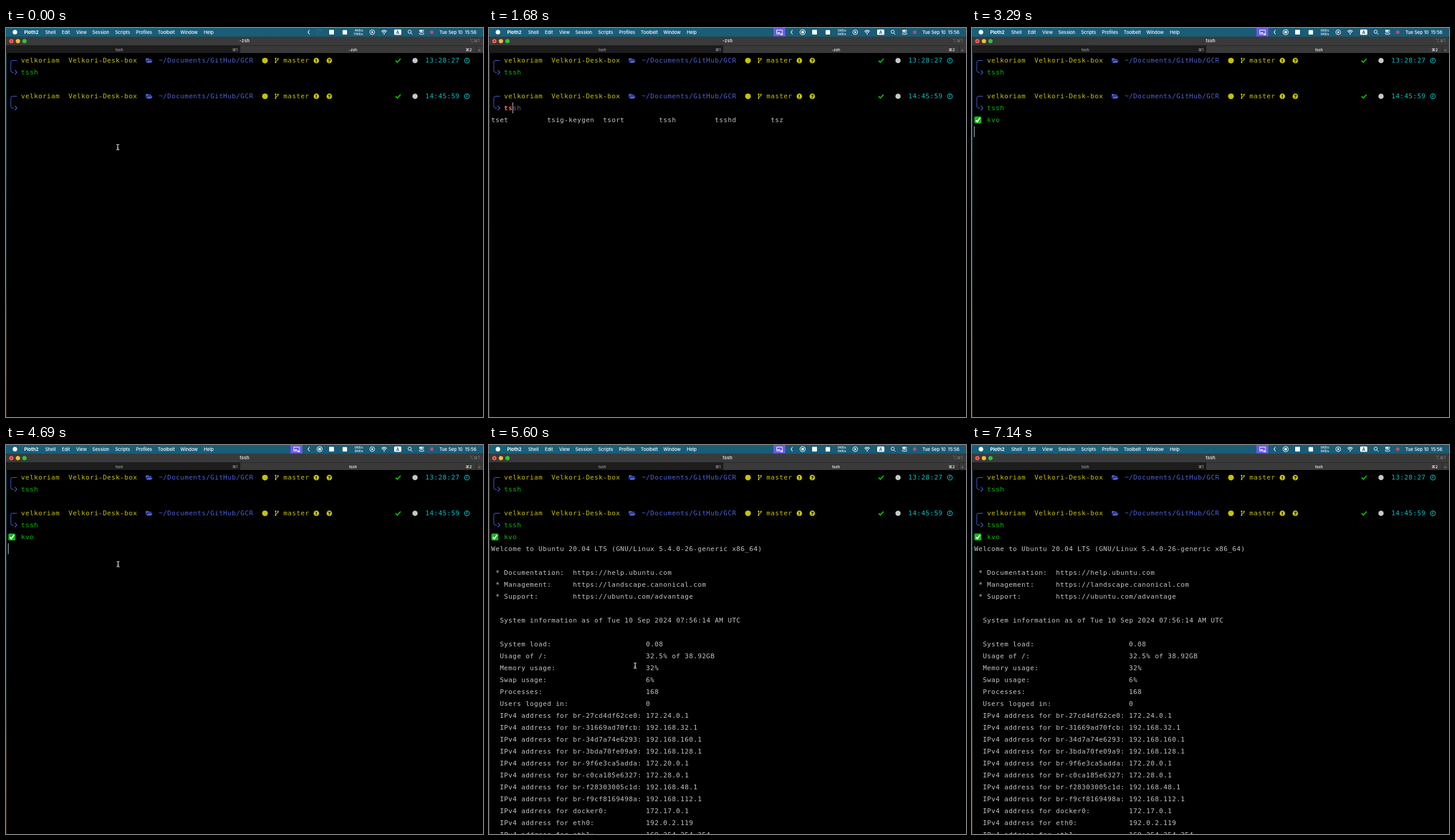
Write an HTML page with a canvas that moves like this. It is 800 px wide and 653 px high and loops after 7.7 s.

```html
<!DOCTYPE html>
<html lang="en">
<head>
<meta charset="utf-8">
<title>Terminal session</title>
<style>
  html, body { margin: 0; width: 100%; height: 100%; overflow: hidden; background: #000; }
  canvas { display: block; }
</style>
</head>
<body>
<canvas id="stage" width="800" height="653"></canvas>
<script>
const ctx = document.getElementById('stage').getContext('2d');
const LOOP = 7700, LEFT = 3.7, CELL = 7.213, ROW = 20;
const MONO = '11px "DejaVu Sans Mono", monospace', MONO_ADVANCE = 6.622;
const UI = 'Inter, sans-serif';
const C = {
  red: '#ff6e67', green: '#00c200', yellow: '#c7c400', blue: '#4e63d9', magenta: '#ca30c7',
  cyan: '#00c5c7', white: '#c7c7c7', gray: '#686868',
  hiCyan: '#60fdff', hiMagenta: '#ff77ff', hiBlue: '#6871ff'
};

const HOSTS = [
  ['kvo', '192.0.2.119', 'MY VPS VPN HK homeweb'],
  ['tallmeadow', '192.168.166.206', 'MY VPS SG homeweb'],
  ['snapwedges', '198.51.100.171', 'MY VPS US homeweb'],
  ['nas', 'velkoriam.com', 'NAS MY'],
  ['nas-ubuntu', 'velkoriam.com', 'NAS MY'],
  ['mistprism', '192.168.103.158', 'MY VPS US'],
  ['hpc', 'atlas8.vqu.edu.sg', 'VQU HCP'],
  ['medhpc', 'medbio.vqu.edu.sg', 'VQU HCP'],
  ['ktrc-vqu01', 'asp2a-login-vqu01', 'VQU KTRC'],
  ['ktrc-vqu02', 'asp2a-login-vqu02', 'VQU KTRC']
];
const WELCOME = `Welcome to Ubuntu 20.04 LTS (GNU/Linux 5.4.0-26-generic x86_64)

 * Documentation:  https://help.ubuntu.com
 * Management:     https://landscape.canonical.com
 * Support:        https://ubuntu.com/advantage

  System information as of Tue 10 Sep 2024 07:56:14 AM UTC
`.split('\n');
const INFO = [
  ['System load:', '0.08'], ['Usage of /:', '32.5% of 38.92GB'], ['Memory usage:', '32%'],
  ['Swap usage:', '6%'], ['Processes:', '168'], ['Users logged in:', '0'],
  ...Object.entries({
    'br-27cd4df62ce0': '172.24.0.1', 'br-31669ad70fcb': '192.168.32.1',
    'br-34d7a74e6293': '192.168.160.1', 'br-3bda70fe09a9': '192.168.128.1',
    'br-9f6e3ca5adda': '172.20.0.1', 'br-c0ca185e6327': '172.28.0.1',
    'br-f28303005c1d': '192.168.48.1', 'br-f9cf8169498a': '192.168.112.1',
    docker0: '172.17.0.1', eth0: '192.0.2.119', eth1: '169.254.254.254'
  }).map(([name, ip]) => [`IPv4 address for ${name}:`, ip])
];

// [start time, value]; the last entry already begun applies
const SPEEDS = [[0, '4KB/s 17KB/s'], [840, '5KB/s 5KB/s'], [2100, '1KB/s 8KB/s'],
  [3290, '0KB/s 0KB/s'], [5740, '0KB/s 2KB/s'], [7000, '0KB/s 0KB/s']];
const TYPED = [[0, ''], [1190, 't'], [1400, 'ts'], [1890, 'tss'], [2100, 'tssh']];
const MOUSE = [[4690, 188, 200], [4900, 190, 212], [5110, 197, 264], [5600, 245, 370],
  [6160, 307, 482], [6510, 328, 530]];
const at = (steps, t) => steps.findLast(s => s[0] <= t)[1];

function rect(x, y, w, h, color, r = 0) {
  ctx.fillStyle = color;
  ctx.beginPath();
  ctx.roundRect(x, y, w, h, r);
  ctx.fill();
}
function dot(x, y, r, color) {
  ctx.fillStyle = color;
  ctx.beginPath();
  ctx.arc(x, y, r, 0, 7);
  ctx.fill();
}
function line(d, color, width = 1) {
  ctx.strokeStyle = color;
  ctx.lineWidth = width;
  ctx.stroke(new Path2D(d));
}
function shape(d, color) {
  ctx.fillStyle = color;
  ctx.fill(new Path2D(d));
}
function label(s, x, y, size, color = '#fff', weight = 400, align = 'left') {
  ctx.font = `${weight} ${size}px ${UI}`;
  ctx.letterSpacing = '0px';
  ctx.textAlign = align;
  ctx.fillStyle = color;
  ctx.fillText(s, x, y);
}
function put(s, col, row, color = C.white, bold = false) {
  ctx.font = (bold ? 'bold ' : '') + MONO;
  ctx.letterSpacing = `${CELL - MONO_ADVANCE}px`;
  ctx.textAlign = 'left';
  ctx.fillStyle = color;
  ctx.fillText(s, LEFT + col * CELL, 58 + row * ROW);
}
const caret = (col, row) => rect(LEFT - .5 + col * CELL, 45 + row * ROW, 1.3, 18, '#a8a8a8');

function menuBar(t) {
  const g = ctx.createLinearGradient(0, 0, 800, 0);
  g.addColorStop(0, '#17607b');
  g.addColorStop(1, '#1b5a74');
  rect(0, 0, 800, 15, g);
  dot(15, 7, 3.8, '#fff');
  label('Ploth2', 42.5, 9.7, 7.6, '#fff', 700, 'center');
  const menus = { Shell: 74.5, Edit: 100.5, View: 126.5, Session: 159, Scripts: 195.5,
    Profiles: 231.5, Toolbelt: 269, Window: 307, Help: 340 };
  for (const [name, x] of Object.entries(menus)) label(name, x, 9.7, 7.5, '#fff', 500, 'center');

  if (t >= 140) {
    rect(477, 0, 20, 14, '#6a5be2');
    line('M482.5 3.5h9.5v6.5h-9.5z', '#fff');
    line('M484 8h4M489 11h4', '#fff', 1.3);
    line('M530.3 7a4.3 4.3 0 1 0-8.6 0a4.3 4.3 0 1 0 8.6 0', '#fff', 1.1);
    rect(524, 5, 4, 4, '#fff', .6);
  } else {
    for (let i = 0; i < 8; i++) {
      const a = i * Math.PI / 4;
      dot(526 + 4 * Math.cos(a), 7 + 4 * Math.sin(a), .55, `rgba(255,255,255,${.15 + i * .06})`);
    }
  }
  line('M509 3.5L506.5 7L509 10.5', '#fff', 1.1);
  rect(542, 3, 8, 8, '#fff', 1);
  rect(564.5, 3.5, 7.5, 7.5, '#fff', 1);
  at(SPEEDS, t).split(' ').forEach((s, i) => label(s, 599, 6.3 + 5.3 * i, 5, '#fff', 500, 'right'));
  line('M618.2 7a4 4 0 1 0-8 0a4 4 0 1 0 8 0', '#fff');
  shape('M613 4.8l3.4 2.2l-3.4 2.2z', '#fff');
  line('M629.8 5.8q4.4-4 8.8 0M631.4 7.7q2.8-2.5 5.6 0', '#fff', 1.2);
  dot(634.2, 9.8, 1.1, '#fff');
  rect(651, 2.5, 12, 9, '#fff', 1.5);
  label('A', 657, 9.7, 7.5, '#1b5a74', 600, 'center');
  line('M679.7 6.3a2.7 2.7 0 1 0-5.4 0a2.7 2.7 0 1 0 5.4 0M679 8.4l2.5 2.6', '#fff');
  rect(693, 3, 8, 3.4, '#fff', 1.7);
  dot(699, 4.7, 1, '#1b5a74');
  line('M694.5 8h5a1.3 1.3 0 0 1 0 2.7h-5a1.3 1.3 0 0 1 0-2.7z', '#fff', .9);
  dot(714, 7, 3, '#a8566f');
  label('Tue Sep 10  15:56', 789, 9.7, 7.5, '#fff', 500, 'right');
}

function windowFrame(title) {
  rect(0, 14.5, 800, 15, '#3a3a3a', [4, 4, 0, 0]);
  ['#ff5f57', '#febc2e', '#28c840'].forEach((c, i) => dot(9 + 11 * i, 22, 3.6, c));
  dot(9, 22, 1.1, '#7a1812');
  label(title, 400, 24.3, 7.6, '#d2d2d2', 700, 'center');
  label('⌥⌘1', 794, 24, 7, '#858585', 400, 'right');
  rect(0, 29.5, 393, 12.5, '#1d1d1d');
  rect(393, 29.5, 407, 12.5, '#393939');
  rect(788, 30, 1, 12, '#262626');
  label('tssh', 190, 38.7, 6.5, '#bbb', 400, 'center');
  label('⌘1', 384, 38.7, 6.5, '#bbb', 400, 'center');
  label(title, 582, 38.7, 6.5, '#fff', 500, 'center');
  label('⌘2', 776, 38.7, 6.5, '#fff', 500, 'center');
  label('+', 794, 39.5, 9, '#858585', 400, 'center');
}

function prompt(row, time) {
  put('velkoriam', 3, row, C.yellow);
  put('Velkori-Desk-box', 14, row, C.yellow);
  put('~/Documents/GitHub/GCR', 35, row, C.blue);
  put('master', 64, row, C.yellow);
  put(time, 97, row, C.cyan);
  ctx.save();
  ctx.translate(0, 54 + row * ROW);
  line('M18.5 .5H11Q8 .5 8 4V17Q8 20.5 11 20.5H13', C.blue);
  line('M14.7 16.7L18.2 20.3L14.7 24', C.blue, 1.2);
  shape('M234.5 3.5V-3.3h4l1.2 1.3h4v1.5h-6.7zM235.3 4.6l2.2-4.2h8.3l-2.3 4.2z', C.blue);
  dot(434.3, .7, 4.8, C.yellow);
  line('M452.2-2.2V3.3M456.2-1.6C456.2 1.2 452.2 .5 452.2 3', C.yellow, 1.1);
  dot(452.2, -2.8, 1.3, C.yellow);
  dot(452.2, 3.8, 1.3, C.yellow);
  dot(456.2, -2.2, 1.3, C.yellow);
  [['!', 520.5], ['?', 542.2]].forEach(([s, x]) => {
    dot(x, .7, 4.6, C.yellow);
    label(s, x, 3.6, 8, '#000', 800, 'center');
  });
  line('M653.5 .8L656.3 3.6L661.8-2.4', C.green, 2.1);
  dot(686, .7, 4.4, C.white);
  line('M777 .7a4 4 0 1 0-8 0a4 4 0 1 0 8 0M773-1.8V1H771.3', C.cyan, 1.2);
  ctx.restore();
}

function typing(t) {
  const typed = at(TYPED, t), done = typed === 'tssh';
  put(typed, 3, 4, done ? C.green : C.red, !done);
  if (typed) put('tssh'.slice(typed.length), 3 + typed.length, 4, C.gray);
  if (t >= 630) caret(3 + typed.length, 4);
  const matches = typed.length > 2 ? ['tssh', 'tsshd']
    : ['tset', 'tsig-keygen', 'tsort', 'tssh', 'tsshd', 'tsz'];
  const width = typed.length > 2 ? 7 : 13;
  if (typed.length > 1) matches.forEach((s, i) => put(s, i * width, 5));
}

function hostList() {
  put('Use ← ↓ ↑ → h j k l to navigate, / toggles search, ? toggles help', 0, 5, C.gray);
  put('?', 0, 6, C.blue);
  put('SSH Alias:', 2, 6, '#e0e0e0');
  HOSTS.forEach(([alias, host, note], i) => {
    const row = 8 + 2 * i, on = i === 0;
    put(alias, 7, row, on ? C.hiCyan : C.cyan, on);
    put(host, 19, row, on ? C.hiMagenta : C.magenta, on);
    put(note, 38, row, on ? C.hiBlue : C.blue, on);
  });
  rect(18.5, 211, 6.5, 6.5, '#f3d3b8', 2);
  rect(22, 211.5, 9, 2.4, '#f3d3b8', 1.2);
  line('M24 214.8h2.5M24 216.6h2', '#d9ac8b', 1.2);
  put('↓', 0, 26);
  put('--------- SSH Details ----------', 0, 28, '#e0e0e0');
  [['Alias:', 'kvo'], ['Host:', '192.0.2.119']].forEach(([key, value], i) => {
    put(key, 0, 29 + i, C.gray);
    put(value, 15, 29 + i);
  });
}

function session(t) {
  rect(4, 148.5, 11.8, 11.8, '#1cb51c', 2);
  line('M6.5 154.6L9 157.4L13.3 151', '#fff', 1.9);
  put('kvo', 3, 5, C.green);
  if (t < 4900) {
    if (t < 3920 || t >= 4480) caret(0, 6);
    return;
  }
  WELCOME.forEach((s, i) => put(s, 0, 6 + i));
  INFO.forEach(([key, value], i) => {
    put(key, 2, 14 + i);
    put(value, 36, 14 + i);
  });
}

function mousePosition(t) {
  if (t < 1400) return [187.5, 200];
  if (t < 4690 || t >= 7000) return null;
  const i = MOUSE.findLastIndex(p => p[0] <= t);
  const [t0, x0, y0] = MOUSE[i], [t1, x1, y1] = MOUSE[i + 1] || [LOOP, x0, y0];
  const k = (t - t0) / (t1 - t0);
  return [x0 + (x1 - x0) * k, y0 + (y1 - y0) * k];
}
function mouse(t) {
  const p = mousePosition(t);
  if (!p) return;
  ctx.save();
  ctx.translate(...p);
  const beam = 'M-2.5-4.5Q0-4.5 0-3Q0-4.5 2.5-4.5M0-3V3M-2.5 4.5Q0 4.5 0 3Q0 4.5 2.5 4.5M-1.2 1.3H1.2';
  line(beam, '#000', 2.6);
  line(beam, '#e8e8e8', 1.1);
  ctx.restore();
}

function draw(t) {
  rect(0, 0, 800, 653, '#000');
  menuBar(t);
  windowFrame(t < 2590 ? '-zsh' : 'tssh');
  const edge = ctx.createLinearGradient(0, 42, 0, 653);
  edge.addColorStop(0, '#1b566b');
  edge.addColorStop(.55, '#17333d');
  edge.addColorStop(.8, '#4d3d22');
  edge.addColorStop(1, '#3d3020');
  rect(0, 42, 1, 611, edge);

  prompt(0, '13:28:27');
  put('tssh', 3, 1, C.green);
  prompt(3, '14:45:59');
  if (t < 2520) typing(t);
  else {
    put('tssh', 3, 4, C.green);
    t < 3290 ? hostList() : session(t);
  }
  mouse(t);
}

function tick() {
  draw(performance.now() % LOOP);
  requestAnimationFrame(tick);
}
tick();
</script>
</body>
</html>
```
